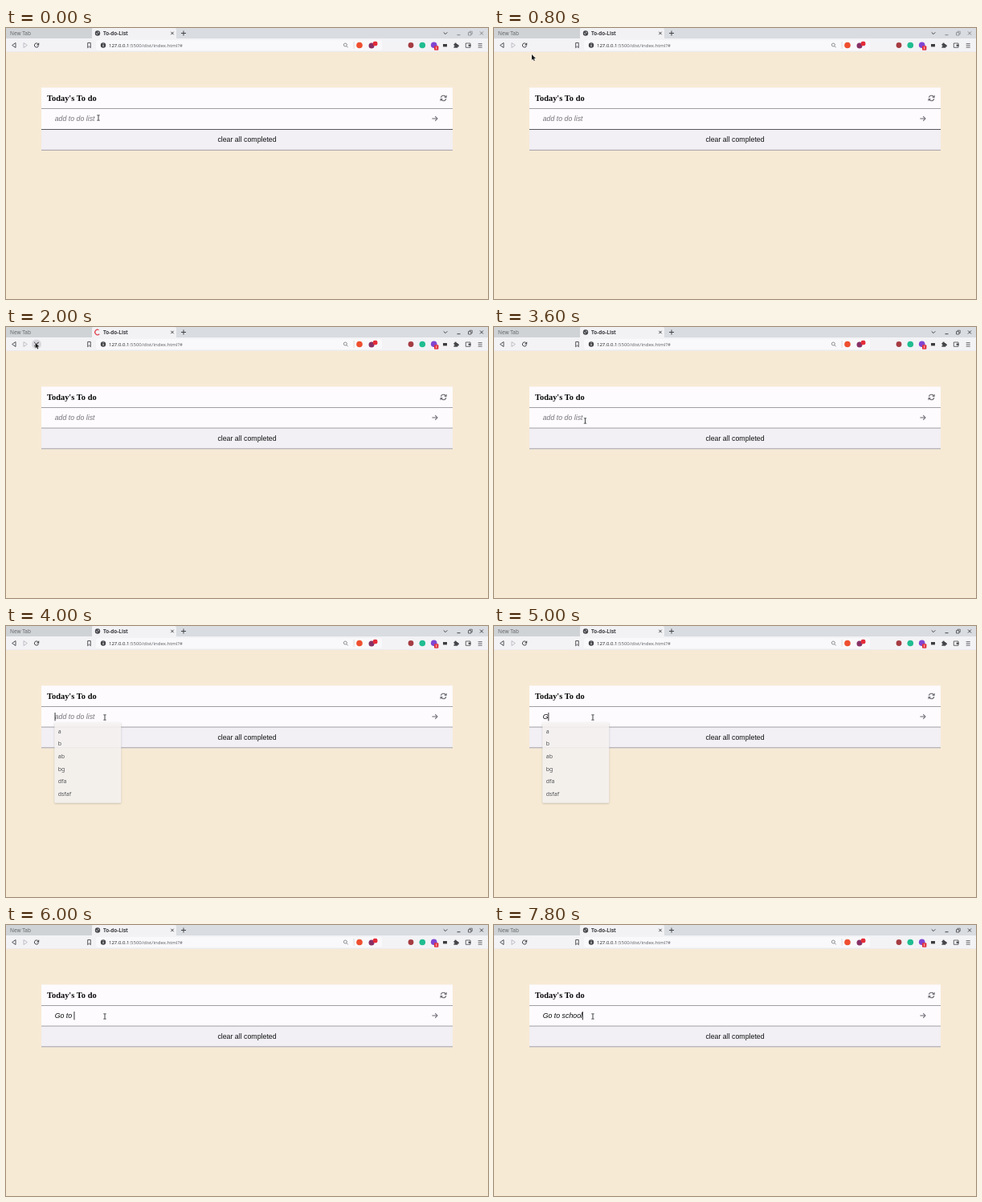
Write an HTML page with a canvas that moves like this. It is 600 px wide and 338 px high and loops after 8000 ms.

```html
<!DOCTYPE html>
<html lang="en">
<head>
<meta charset="utf-8">
<title>To-do-List</title>
<style>
html, body { margin: 0; width: 100%; height: 100%; overflow: hidden; background: #f7ead5; }
canvas { display: block; width: 600px; height: 338px; }
</style>
</head>
<body>
<canvas id="stage"></canvas>
<script>
const LOOP = 8000, STEP = 200;
const UI = '"Noto Sans", "Open Sans", sans-serif';
const SANS = '"Liberation Sans", Arial, sans-serif';
const SERIF = '"Liberation Serif", "Times New Roman", serif';
const INK = '#45464a', TAU = Math.PI * 2;

const canvas = document.getElementById('stage');
const ratio = window.devicePixelRatio || 1;
canvas.width = 600 * ratio;
canvas.height = 338 * ratio;
const ctx = canvas.getContext('2d');
ctx.scale(ratio, ratio);

// Pointer waypoints: time, x, y
const pointerPath = [
  [0, 115, 112], [200, 109, 106], [400, 91, 85], [600, 66, 56], [800, 47, 33], [1000, 39, 23],
  [1200, 36.5, 19.5], [2800, 36.5, 19.5], [3000, 46, 36], [3200, 80, 82], [3400, 104, 112],
  [3600, 113.5, 117], [3800, 123, 114]
];
const keyTimes = [5000, 5200, 5400, 5600, 5800, 6000, 6600, 7000, 7200, 7400, 7600, 7800];
const phrase = 'Go to school';
const suggestions = ['a', 'b', 'ab', 'bg', 'dfa', 'dsfaf'];

function rect(x, y, w, h, color) {
  ctx.fillStyle = color;
  ctx.fillRect(x, y, w, h);
}

function text(str, x, y, font, color, align = 'left') {
  ctx.font = font;
  ctx.fillStyle = color;
  ctx.textAlign = align;
  ctx.fillText(str, x, y);
}

function disc(x, y, r, color) {
  ctx.fillStyle = color;
  ctx.beginPath();
  ctx.arc(x, y, r, 0, TAU);
  ctx.fill();
}

function arc(x, y, r, from, to, color, width = 1) {
  ctx.strokeStyle = color;
  ctx.lineWidth = width;
  ctx.beginPath();
  ctx.arc(x, y, r, from, to);
  ctx.stroke();
}

function line(points, color, width = 1, closed = false) {
  ctx.strokeStyle = color;
  ctx.lineWidth = width;
  ctx.beginPath();
  points.forEach(([x, y]) => ctx.lineTo(x, y));
  if (closed) ctx.closePath();
  ctx.stroke();
}

function polygon(points, color) {
  ctx.fillStyle = color;
  ctx.beginPath();
  points.forEach(([x, y]) => ctx.lineTo(x, y));
  ctx.fill();
}

function box(x, y, w, h, r, color) {
  ctx.fillStyle = color;
  ctx.beginPath();
  ctx.roundRect(x, y, w, h, r);
  ctx.fill();
}

function cross(x, y, r, color, width = 1) {
  line([[x - r, y - r], [x + r, y + r]], color, width);
  line([[x + r, y - r], [x - r, y + r]], color, width);
}

function globe(x, y) {
  disc(x, y, 3.2, INK);
  polygon([[x - 2.3, y - 1], [x - .2, y + .4], [x - .7, y + 2.3]], '#d8d8dc');
  polygon([[x + .1, y - 2.3], [x + 1.9, y - 1], [x + .9, y + .6]], '#d8d8dc');
}

function reloadIcon(x, y) {
  arc(x, y, 2.6, .25, TAU - .8, INK);
  polygon([[x + 3.2, y - 3.2], [x + 3.2, y], [x, y]], INK);
}

function syncIcon(x, y) {
  for (const turn of [0, Math.PI]) {
    ctx.save();
    ctx.translate(x, y);
    ctx.rotate(turn);
    arc(0, 0, 3.2, Math.PI + .2, TAU - .55, '#737078', 1.2);
    polygon([[4.1, -4], [4.1, -.6], [.8, -.6]], '#737078');
    ctx.restore();
  }
}

function drawTabs(t, loading) {
  const active = t >= 1400;
  const controls = active ? '#45464a' : '#85878b';
  rect(0, 0, 600, 13, '#d9dce0');
  rect(0, 0, 107, 13, '#d0d3d6');
  box(107, 0, 105, 14, [2, 2, 0, 0], '#f2f2f5');
  text('New Tab', 5, 9, `6.5px ${UI}`, '#66686c');
  text('To-do-List', 121, 9, `bold 6.4px ${UI}`, '#3c3d41');
  if (loading) {
    const spin = (t - 2000) / 1568 * TAU;
    arc(114, 6.5, 3.2, spin + .8, spin + 5.2, '#e0434e', 1.2);
  } else if (t < 1400 || t >= 2600) {
    globe(114, 6.5);
  }
  cross(207, 6.5, 1.7, INK);
  line([[218, 6.5], [224, 6.5]], INK);
  line([[221, 3.5], [221, 9.5]], INK);
  line([[544.7, 5.4], [547, 7.7], [549.3, 5.4]], INK);
  line([[561.5, 8.7], [565.5, 8.7]], controls);
  line([[575.5, 5.7], [579, 5.7], [579, 9], [575.5, 9]], controls, .8, true);
  line([[577, 5.5], [577, 4.2], [580.3, 4.2], [580.3, 7.5], [579, 7.5]], controls, .7);
  cross(592, 6.5, 2, controls);
}

function drawToolbar(t, loading) {
  rect(0, 13, 600, 17, '#f3f3f6');
  box(112, 15, 356, 13, 3, '#f9f9fb');
  rect(0, 29.5, 600, .5, '#e4e1df');

  line([[12, 18.5], [7.6, 21.5], [12, 24.5]], INK, .9, true);
  line([[22, 18.5], [26.4, 21.5], [22, 24.5]], '#b9babe', .9, true);
  if (t >= 1200 && t < 3000) disc(38, 21.5, 6, '#d9d9dd');
  if (loading) cross(38, 21.5, 2.7, INK, 1.1);
  else reloadIcon(38, 21.5);
  line([[101.7, 18.5], [105.3, 18.5], [105.3, 24.7], [103.5, 23], [101.7, 24.7]], INK, .9, true);

  disc(121, 21.5, 3.2, INK);
  rect(120.6, 21, .9, 2.3, '#fff');
  rect(120.6, 19.4, .9, .9, '#fff');
  const font = `6px ${UI}`;
  text('127.0.0.1', 128, 23.7, font, '#292a2d');
  text(':5500/dist/index.html?#', 128 + ctx.measureText('127.0.0.1').width, 23.7, font, '#67686d');

  arc(422.4, 21, 2, 0, TAU, '#77787d', .8);
  line([[423.8, 22.5], [425.6, 24.3]], '#77787d', .9);
  rect(432.7, 17, .7, 9, '#cfcfd4');
  disc(440, 21.5, 3.8, '#ee5030');
  disc(455, 22, 3.5, '#873267');
  box(456.8, 16.7, 5.6, 5.5, 2, '#e52c39');

  disc(504, 21.5, 3.4, '#a53c42');
  disc(518.3, 21.5, 3.8, '#20bd91');
  disc(532.7, 21.2, 3.8, '#8046d2');
  box(533, 22.3, 5.4, 5.5, 1, '#e2323d');
  rect(535.4, 23.4, .7, 3.2, '#fff');
  rect(544, 20, 5, 3.4, '#3d3d40');
  rect(557.4, 20, 4.9, 4.7, INK);
  disc(559.6, 19.7, 1.3, INK);
  disc(562.5, 22.2, 1.3, INK);
  disc(557.5, 22.4, .9, '#f3f3f6');
  line([[572.3, 19], [578, 19], [578, 24.3], [572.3, 24.3]], INK, .8, true);
  rect(575.6, 20.7, 3, 2, INK);
  for (let y = 19.3; y < 25; y += 2.2) rect(587.7, y, 5, .8, INK);
}

function drawCard(t, typed) {
  const fresh = t >= 1800;
  const shift = fresh ? -.4 : 0;
  rect(44, 74.3, 512, 78, '#fdfbfe');
  rect(44, 126.4, 512, 25.6, '#f2f0f5');
  rect(44, 100, 512, .9, '#96939a');
  rect(44, 126 + shift, 512, .9, fresh ? '#96939a' : '#47464b');
  rect(44, 151.8 + shift, 512, .9, '#96939a');
  text("Today's To do", 51, 91, `bold 10.4px ${SERIF}`, '#080808');
  text(typed || 'add to do list', 60.7, 116, `italic 8.79px ${SANS}`, typed ? '#0b0b0c' : '#77747a');
  text('clear all completed', 300, 142.1 + shift, `8.79px ${SANS}`, '#101012', 'center');
  syncIcon(544.6, 87.5);
  line([[530.4, 113], [537, 113]], '#737078', 1.1);
  line([[534.2, 110.2], [537, 113], [534.2, 115.8]], '#737078', 1.1);
}

function drawCaret(t, typed) {
  if (t < 4000 || (t >= 4400 && t < 5000)) return;
  ctx.font = `italic 8.79px ${SANS}`;
  rect(60.6 + ctx.measureText(typed).width, 108, .9, 10.3, '#1b1b1d');
}

function drawSuggestions() {
  ctx.save();
  ctx.shadowColor = 'rgba(70, 60, 50, .35)';
  ctx.shadowBlur = 2 * ratio;
  ctx.shadowOffsetY = .6 * ratio;
  box(60.3, 120.3, 83, 100.5, 1, 'rgba(252, 250, 248, .86)');
  ctx.restore();
  suggestions.forEach((word, i) =>
    text(word, 64.7, 133.7 + i * 15.6, `7px ${UI}`, '#505054'));
}

function pointerAt(t) {
  const next = pointerPath.findIndex(p => p[0] > t);
  if (next < 0) return pointerPath[pointerPath.length - 1].slice(1);
  const [t0, x0, y0] = pointerPath[next - 1];
  const [t1, x1, y1] = pointerPath[next];
  const k = (t - t0) / (t1 - t0);
  return [x0 + (x1 - x0) * k, y0 + (y1 - y0) * k];
}

function drawPointer(t) {
  const [x, y] = pointerAt(t);
  if (x > 52 && y > 101 && y < 126) {
    line([[x, y - 3], [x, y + 3]], '#303033', .9);
    for (const end of [-3.2, 3.2]) line([[x - 1.7, y + end], [x + 1.7, y + end]], '#303033', .8);
    return;
  }
  const shape = [[0, 0], [0, 7], [1.6, 5.5], [2.7, 8], [3.8, 7.5], [2.8, 5.1], [5, 5.1]]
    .map(([dx, dy]) => [x + dx, y + dy]);
  line(shape, '#fff', 1, true);
  polygon(shape, '#19191b');
}

function draw(now) {
  const t = Math.floor((now % LOOP) / STEP) * STEP;
  const loading = t >= 1600 && t < 2600;
  const typed = phrase.slice(0, keyTimes.filter(k => k <= t).length);
  rect(0, 0, 600, 338, '#f7ead5');
  drawTabs(t, loading);
  drawToolbar(t, loading);
  drawCard(t, typed);
  drawCaret(t, typed);
  if (t >= 4000 && t < 5200) drawSuggestions();
  drawPointer(t);
}

const start = performance.now();
function tick() {
  draw(performance.now() - start);
  requestAnimationFrame(tick);
}
tick();
</script>
</body>
</html>
```
